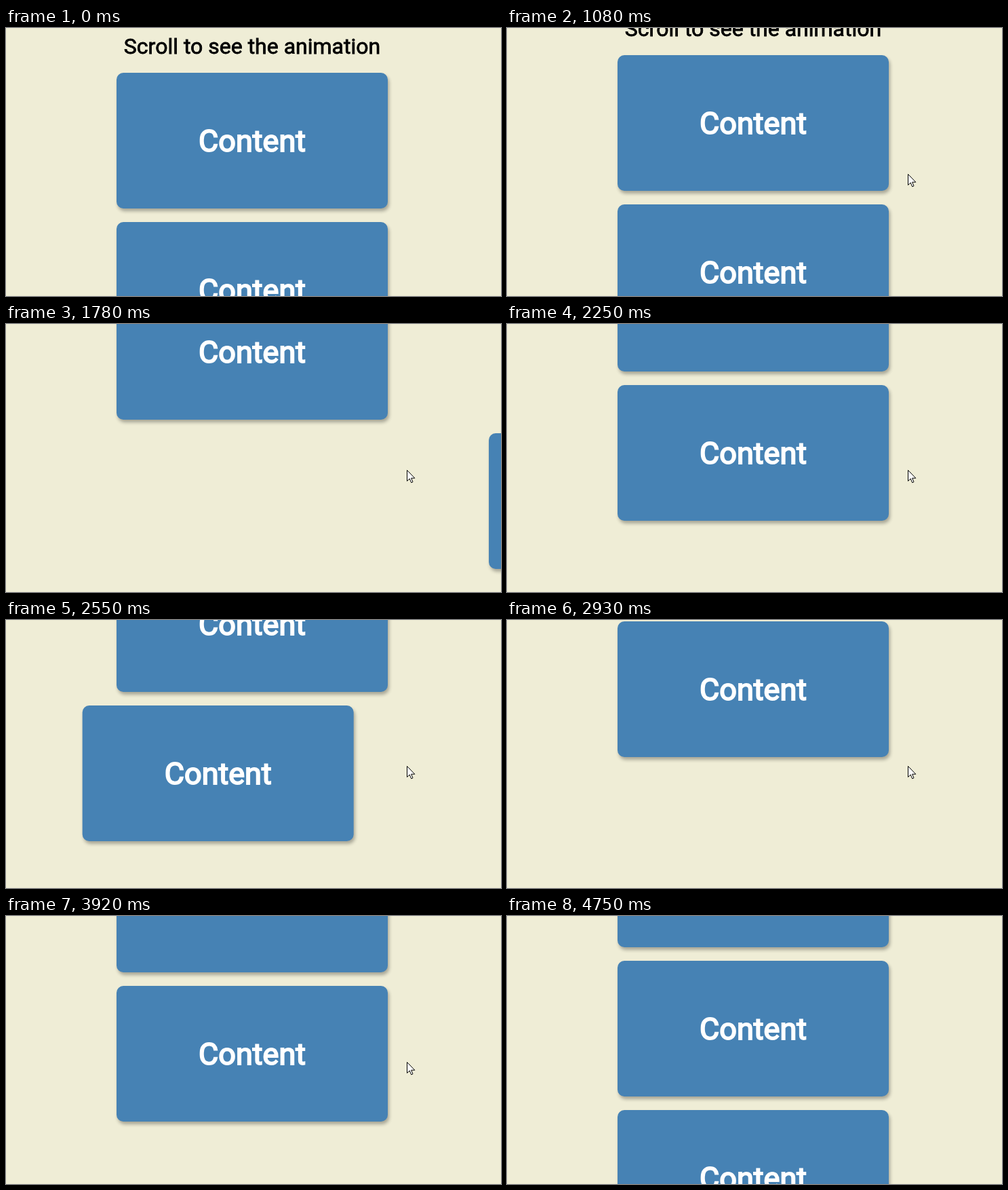
These frames come from a looping animation (730x395 px, 5.29 s). An HTML page:

```html
<!DOCTYPE html>
<html lang="en">
<head>
<meta charset="utf-8">
<title>Scroll animation</title>
<style>
  html, body { margin: 0; width: 100%; height: 100%; overflow: hidden; background: #efedd6; }
  body { position: relative; font-family: Roboto, sans-serif; }
  #page { position: absolute; inset: 0; }
  h1, h2 { margin: 0; font-weight: 400; text-align: center; white-space: nowrap; }
  h1 {
    position: absolute; left: 0; top: 8px; width: 726px;
    font-size: 32px; line-height: 38px; color: #000;
    -webkit-text-stroke: .8px #000;
  }
  .box {
    position: absolute; left: 163px; width: 400px; height: 200px;
    background: steelblue; border-radius: 10px;
    box-shadow: 2px 4px 5px rgba(0, 0, 0, .3);
  }
  h2 {
    padding-top: 74px; font-size: 45px; line-height: 53px; color: #fff;
    -webkit-text-stroke: 1.9px #fff;
  }
  #cursor { position: absolute; left: 0; top: 0; width: 14px; height: 21px; }
</style>
</head>
<body>
<div id="page"><h1>Scroll to see the animation</h1></div>
<svg id="cursor" viewBox="0 0 14 21">
  <path d="M.5 .5V16.5L4.2 13 6.7 18.8 9 17.8 6.6 12.2H11.8Z" fill="#fff" stroke="#000"/>
</svg>
<script>
const LOOP = 5290, STEP = 75, BOXES = 7;
const SHOW_LINE = 316; // a box slides in once its top is above this line
const page = document.getElementById('page');
const cursor = document.getElementById('cursor');

// Wheel moves; the picture steps on a grid that restarts at each "shown".
const moves = [
  { shown: 1080, start: 1003, length: 225, distance: 100 },
  { shown: 1550, start: 1460, length: 439, distance: 300 },
  { shown: 2250, start: 2203, length: 258, distance: 200 },
  { shown: 2780, start: 2669, length: 586, distance: 300 },
  { shown: 3770, start: 3720, length: 279, distance: 200 }
];

const progress = (t, start, length) => Math.min(1, Math.max(0, (t - start) / length));
const smooth = p => (1 - Math.cos(Math.PI * p)) / 2;
const unsmooth = f => Math.acos(1 - 2 * f) / Math.PI;
const place = (el, x, y) => { el.style.transform = `translate(${x}px, ${y}px)`; };

const scrollAt = t => Math.round(moves.reduce(
  (sum, m) => sum + m.distance * smooth(progress(t, m.start, m.length)), 0));

// The time at which the page has scrolled by y.
function timeOf(y) {
  if (y <= 0) return -LOOP;
  for (const m of moves) {
    if (y < m.distance) return m.start + m.length * unsmooth(y / m.distance);
    y -= m.distance;
  }
}

const slides = Array.from({ length: BOXES }, (_, i) => {
  const top = 66 + 220 * i;
  const box = document.createElement('div');
  box.className = 'box';
  box.style.top = top + 'px';
  box.innerHTML = '<h2>Content</h2>';
  page.append(box);
  const from = i % 2 ? -1600 : 1600;
  const slide = box.animate({ transform: [`translateX(${from}px)`, 'translateX(0px)'] },
    { delay: timeOf(top - SHOW_LINE), duration: 400, easing: 'ease', fill: 'both' });
  slide.pause();
  return slide;
});

// The pointer curves in from the lower right, rests, and leaves the same way.
function drawCursor(t) {
  const enter = 1 - progress(t, 70, 225);
  const leave = progress(t, 4145, 525);
  place(cursor, 591 + 76 * enter + 109 * leave,
    215 + 157 * enter + 171 * (1 - (1 - leave) ** 2.5));
  cursor.style.visibility = t >= 70 && t < 4700 ? 'visible' : 'hidden';
}

const begin = performance.now();
function draw() {
  const now = (performance.now() - begin) % LOOP;
  const from = Math.max(0, ...moves.map(m => m.shown).filter(s => s <= now));
  const t = from + STEP * Math.floor((now - from) / STEP);
  place(page, 0, -scrollAt(t));
  for (const slide of slides) slide.currentTime = t;
  drawCursor(t);
  requestAnimationFrame(draw);
}
draw();
</script>
</body>
</html>
```
